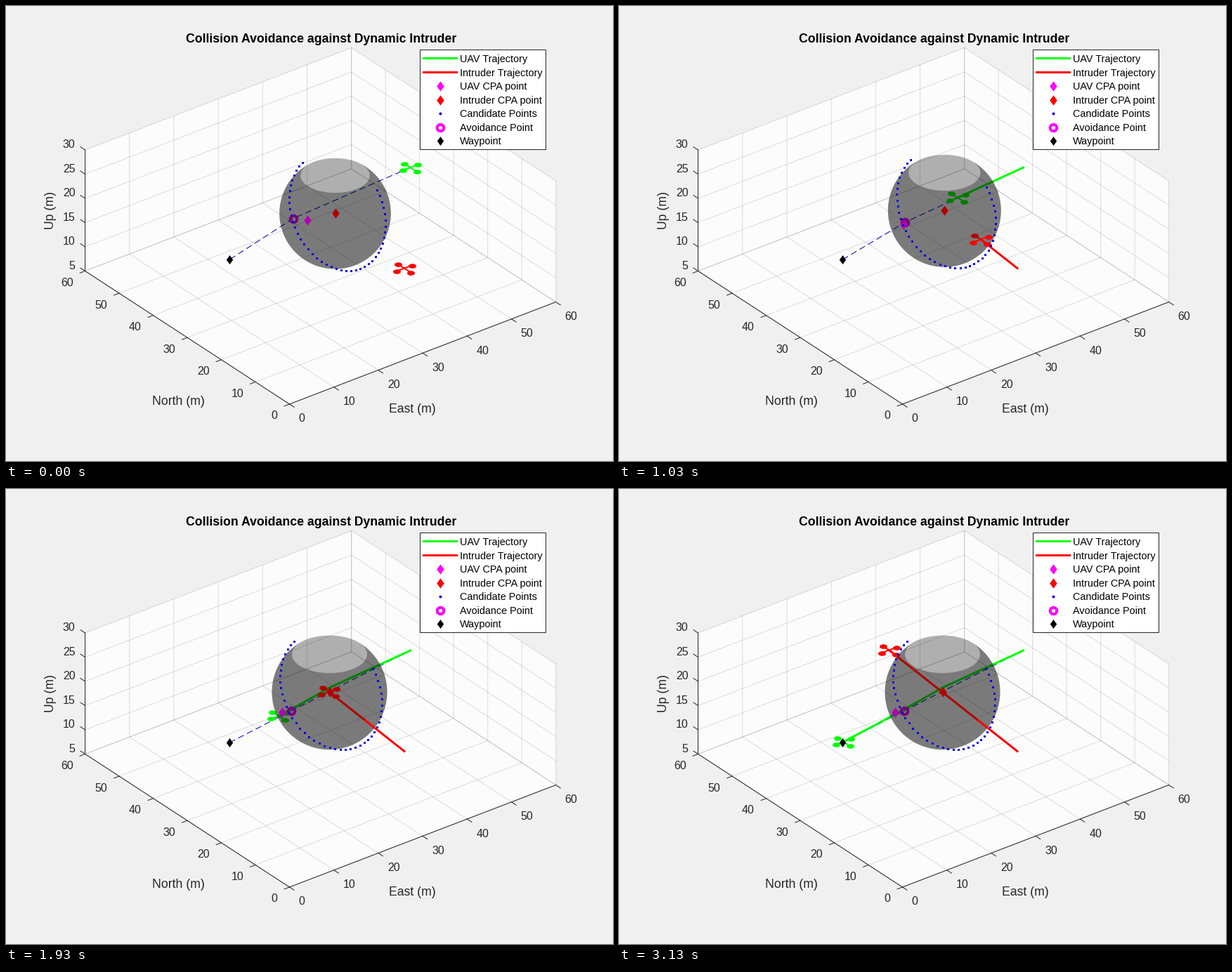
Write a matplotlib script that moves like this. It is 864 by 648 pixels and loops after 3160 ms.

```python
import numpy as np
import matplotlib.pyplot as plt
from matplotlib.animation import FuncAnimation
from matplotlib.patches import Polygon, Rectangle

W, H = 864, 648
LOOP_MS, FRAMES = 3160, 95
SETTLE = 46  # step at which the avoidance geometry stops changing
SCALE, AZ, EL = 7.965, np.radians(37.5), np.radians(30)
INK = "#262626"
GREEN, RED, MAGENTA, BLUE = "#00ff00", "#ff0000", "#ff00ff", "#0000e6"
BACK, FAR_SHELL, MID, NEAR_SHELL, FRONT, DOTS, TOP = range(3, 10)

plt.rcParams["font.family"] = "Liberation Sans"
fig = plt.figure(figsize=(W / 72, H / 72), dpi=72, facecolor="#f0f0f0")
ax = fig.add_axes([0, 0, 1, 1])
ax.set_xlim(0.5, W + 0.5)
ax.set_ylim(H, 0)
ax.axis("off")


def project(e, n, u):
    """East, north, up in metres to stage pixels."""
    x = 404 + SCALE * (np.cos(AZ) * e - np.sin(AZ) * n)
    depth = np.sin(AZ) * e + np.cos(AZ) * n
    y = 567 - SCALE * (np.sin(EL) * depth + np.cos(EL) * (u - 5))
    return x, y


def polyline(points, **style):
    xs, ys = zip(*(project(*p) for p in points))
    ax.plot(xs, ys, **style)


def label(x, y, text, size=16, color=INK, ha="center", **kw):
    ax.text(x, y, text, fontsize=size, color=color, ha=ha, va="baseline",
            zorder=TOP + 2, **kw)


def tick(point, step, shift, ha, text):
    """Tick mark along step, with its label at shift from the axis."""
    x, y = project(*point)
    ax.plot([x, x + step[0]], [y, y + step[1]], color=INK, lw=1, zorder=2)
    label(x + shift[0], y + shift[1], text, ha=ha)


# Box, grid and axes
box = [(0, 60, 30), (60, 60, 30), (60, 0, 30), (60, 0, 5), (0, 0, 5), (0, 60, 5)]
ax.add_patch(Polygon([project(*p) for p in box], fc="#fcfcfc", lw=0, zorder=0))
grid = dict(color=INK, alpha=0.15, lw=1, zorder=1)
for v in range(0, 61, 10):
    polyline([(v, 0, 5), (v, 60, 5), (v, 60, 30)], **grid)
    polyline([(0, v, 5), (60, v, 5), (60, v, 30)], **grid)
    tick((v, 0, 5), (6.6, 4.3), (13, 25.5), "left", str(v))
    tick((0, v, 5), (-7.4, 2.8), (-17, 21.5), "right", str(v))
for v in range(5, 31, 5):
    polyline([(0, 60, v), (60, 60, v), (60, 0, v)], **grid)
    tick((0, 60, v), (-6.6, -4.3), (-14, -2.5), "right", str(v))
polyline([(0, 60, 30), (0, 60, 5), (0, 0, 5), (60, 0, 5)],
         color=INK, lw=1, zorder=2)

label(448.7, 52, "Collision Avoidance against Dynamic Intruder", 17.6, "black",
      weight="bold")
label(245.5, 568, "North (m)", 17.6)
label(579, 579, "East (m)", 17.6)
label(69, 291, "Up (m)", 17.6, rotation=90, rotation_mode="anchor")

# Markers
DIAMOND = [(0, -1), (0.72, 0), (0, 1), (-0.72, 0), (0, -1)]
turn = np.linspace(0, 2 * np.pi, 25)
DISC = list(zip(np.cos(turn), 0.6 * np.sin(turn)))


def marker(shape, color, size, z, xy=((), ()), **kw):
    kw.setdefault("mew", 0)
    return ax.plot(*xy, ls="none", marker=shape, color=color, ms=size,
                   zorder=z, **kw)[0]


def diamond(color, z, xy=((), ()), size=14.5):
    return marker(DIAMOND, color, size, z, xy)


def ring(z, xy=((), ())):
    return marker("o", MAGENTA, 9.5, z, xy, mfc="none", mew=4)


def key_line(color, z, xy):
    x, y = xy
    ax.plot([x[0] - 23.5, x[0] + 23.5], [y[0] - 1] * 2, color=color, lw=3, zorder=z)


# Legend
ax.add_patch(Rectangle((589, 62), 179, 142, fc="white", ec=INK, lw=1, zorder=TOP))
legend = [
    ("UAV Trajectory", lambda z, xy: key_line(GREEN, z, xy)),
    ("Intruder Trajectory", lambda z, xy: key_line(RED, z, xy)),
    ("UAV CPA point", lambda z, xy: diamond(MAGENTA, z, xy)),
    ("Intruder CPA point", lambda z, xy: diamond(RED, z, xy)),
    ("Candidate Points", lambda z, xy: marker("o", BLUE, 4, z, xy)),
    ("Avoidance Point", ring),
    ("Waypoint", lambda z, xy: diamond("black", z, xy, 13)),
]
for i, (name, draw_key) in enumerate(legend):
    y = 75 + 19.55 * i
    draw_key(TOP + 1, ([618], [y]))
    label(646, y + 5, name, 14.4, "black", ha="left")

# Motion
START, WAYPOINT = (576, 230), (318.5, 361.3)
ROTORS = np.array([(-9, -5.5), (10.5, -4), (-11, 4), (9, 6)])
steps = np.arange(FRAMES)


def lerp(a, b, p):
    return np.add(a, np.subtract(b, a) * p)


# The UAV swerves past the sphere, then slows towards the waypoint
way_times = [0, 37, 46, 64, FRAMES - 1]
way_points = [START, (461, 283), (424, 304), (371, 333), (320, 360)]
uav_path = np.stack([np.interp(steps, way_times, c) for c in zip(*way_points)], 1)

# The intruder flies straight, gaining a little speed
gain = (steps / (FRAMES - 1)) ** 1.1
intruder_path = lerp((567.5, 373.5), (385, 229.5), gain[:, None])


class Craft:
    """Trail, arms and rotors of one drone in one depth layer."""

    def __init__(self, color, z):
        self.trail, = ax.plot([], [], color=color, lw=3, zorder=z)
        self.arms, = ax.plot([], [], color=color, lw=2, zorder=z)
        self.rotors = marker(DISC, color, 11, z)

    def place(self, trail, center, rotors):
        gap = (np.nan, np.nan)
        arms = [p for r in rotors for p in (center, r, gap)]
        for artist, pts in ((self.trail, trail), (self.arms, arms),
                            (self.rotors, rotors)):
            artist.set_data(*np.reshape(pts, (-1, 2)).T)


def shell(z):
    return ax.add_patch(Polygon([(0, 0)], fc="black", alpha=0.3, lw=0, zorder=z))


route, = ax.plot([], [], color="#0000be", lw=1, dashes=(9, 5), zorder=BACK)
uav = Craft(GREEN, BACK)
avoid = ring(BACK)
far_shell, near_shell = shell(FAR_SHELL), shell(NEAR_SHELL)
intruder_in, intruder_out = Craft(RED, MID), Craft(RED, FRONT)
uav_cpa, intruder_cpa = diamond(MAGENTA, MID), diamond(RED, MID)
dots = marker("s", BLUE, 3, DOTS)
diamond("black", DOTS, ([WAYPOINT[0]], [WAYPOINT[1]]), 13)


def draw_shells(center, r):
    """Sphere open above a fixed height; the walls overlap below the rim."""
    h = 7.8 * SCALE
    rim = np.sqrt(r * r - h * h)
    edge = np.arcsin(h / (r * np.cos(EL)))
    meet = np.arccos(r * np.cos(edge) / rim)
    a = np.linspace(np.pi - edge, 2 * np.pi + edge, 120)
    outline = np.c_[r * np.cos(a), -r * np.sin(a)]
    for patch, end in ((far_shell, np.pi - meet), (near_shell, -np.pi - meet)):
        b = np.linspace(meet, end, 60)
        arc = np.c_[rim * np.cos(b),
                    -h * np.cos(EL) - rim * np.sin(EL) * np.sin(b)]
        patch.set_xy(center + np.vstack([outline, arc]))


def draw_cone(f):
    """Sphere, closest points, candidates and route drift until settled."""
    p = min(f / SETTLE, 1)
    curve = (p, p * p)
    center = lerp((469, 295.2), (461, 289.2), p)
    target = lerp((409.5, 302.5), (406.7, 315.7), curve)
    draw_shells(center, lerp(79.3, 82, p * p))
    intruder_cpa.set_data(*center.reshape(2, 1))
    uav_cpa.set_data(*lerp((429.5, 305), (393, 318.3), curve).reshape(2, 1))
    avoid.set_data(*target.reshape(2, 1))
    route.set_data(*zip(START, target, WAYPOINT))

    hub = lerp((472, 292.7), (463, 287), p)
    t = np.arange(3.9, -0.63, -np.radians(6))
    dots.set_data(hub[0] + lerp(68.5, 72.5, p * p) * np.cos(t),
                  hub[1] + 84 * np.cos(t - 1.345))


def update(f):
    draw_cone(f)
    uav.place(uav_path[:f + 1], uav_path[f], uav_path[f] + ROTORS)

    # The intruder enters the sphere where x + y drops below this line
    pos, trail = intruder_path[f], intruder_path[:f + 1]
    rotors = pos + ROTORS
    inside = rotors.sum(axis=1) < 838
    n = int((trail.sum(axis=1) >= 838).sum())
    intruder_in.place(trail[n - 1:], pos, rotors[inside])
    intruder_out.place(trail[:n], pos, rotors[~inside])
    return []


anim = FuncAnimation(fig, update, frames=FRAMES, interval=LOOP_MS / FRAMES,
                     init_func=lambda: update(0), repeat=True, repeat_delay=0)
plt.show()
```
